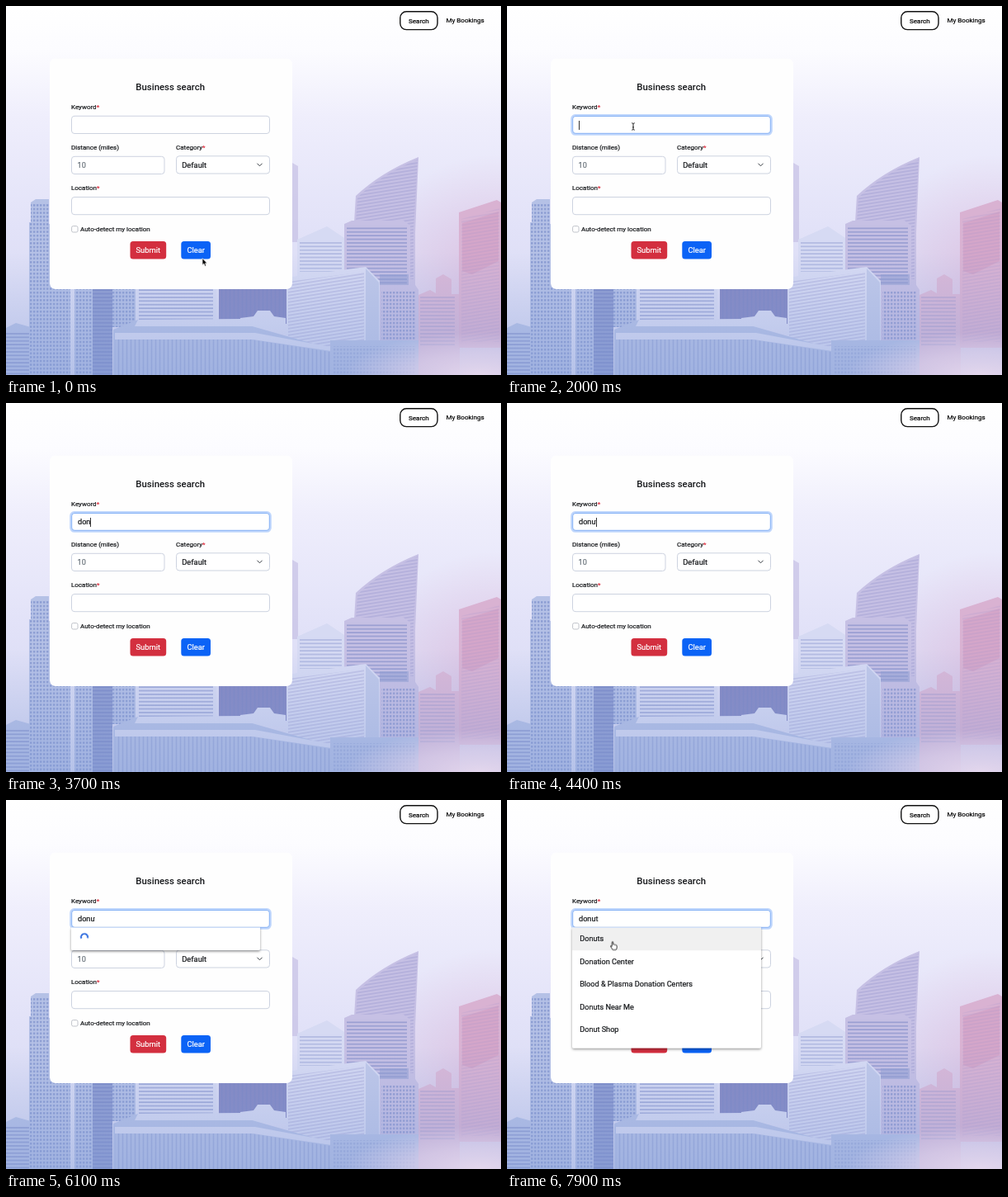
Write an HTML page that moves like this. It is 600 px wide and 447 px high and loops after 8 s.

```html
<!DOCTYPE html>
<html lang="en">
<head>
<meta charset="utf-8">
<title>Business search</title>
<style>
html, body { margin: 0; width: 100%; height: 100%; overflow: hidden; background: #fff; }
svg { display: block; position: absolute; left: 0; top: 0; width: 600px; height: 447px; }
text, .typed { font-family: Roboto, Arial, sans-serif; font-size: 9.14px; }
text { --ink: #16181b; fill: var(--ink); stroke: var(--ink); stroke-width: .22px; }
.label { font-size: 8px; }
.req { fill: #dc3545; stroke: #dc3545; }
.title { font-size: 11.4px; font-weight: 500; stroke: none; }
.mid { text-anchor: middle; }
.nav { font-size: 8.05px; --ink: #000; }
.btn { font-size: 9.4px; --ink: #fff; text-anchor: middle; }
.hint { --ink: #6c757d; }
.field { fill: #fff; stroke: #cdd3e0; stroke-width: 1; }

/* skyline */
.blue { fill: #b5c1e6; } .deep { fill: #8f9dd1; } .pale { fill: #d6daf3; }
.lilac { fill: #c6c0e4; } .pink { fill: #d9b2d2; }

/* timeline: 8 s, 1% = 80 ms */
.focus, .typed, .cursor, .arrow, .beam, .hand, .loading, .results, .hover {
  animation: 8s step-end infinite;
}
.focus { animation-name: focus; }
@keyframes focus { 0% { opacity: 0 } 10% { opacity: 1 } }

.typed {
  position: absolute; left: 87px; top: 138.5px; height: 11px; line-height: 11px;
  color: #16181b; -webkit-text-stroke: .22px; overflow: hidden; white-space: nowrap;
  border-right: 1px solid #333; animation-name: type, caret;
}
@keyframes type {
  0% { width: 0 } 36.25% { width: 5.2px } 41.25% { width: 10.4px }
  45% { width: 15.4px } 52.5% { width: 20.5px } 80% { width: 23.6px }
}
@keyframes caret {
  0% { border-color: transparent } 10% { border-color: #333 }
  16.25% { border-color: transparent } 22.5% { border-color: #333 }
  28.75% { border-color: transparent } 35% { border-color: #333 }
  58.75% { border-color: transparent } 65% { border-color: #333 }
  71.25% { border-color: transparent } 80% { border-color: #333 }
  86.25% { border-color: transparent } 92.5% { border-color: #333 }
  98.75% { border-color: transparent }
}

.loading { animation-name: loading; }
@keyframes loading { 0% { opacity: 0 } 66.25% { opacity: 1 } 90% { opacity: 0 } }
.results { animation-name: results; }
@keyframes results { 0% { opacity: 0 } 90% { opacity: 1 } }
.hover { animation-name: hover; }
@keyframes hover { 0% { opacity: 0 } 93.75% { opacity: 1 } }
.spin { transform-origin: 95px 166.3px; animation: spin 1s linear infinite; }
@keyframes spin { to { transform: rotate(360deg) } }

.cursor { animation-name: move; animation-timing-function: ease-in-out; }
@keyframes move {
  0%, 1.25% { transform: translate(238px, 305.6px) }
  8.75%, 91.25% { transform: translate(153px, 146px) }
  96.25%, 100% { transform: translate(128px, 171.5px) }
}
.arrow { animation-name: arrow; }
@keyframes arrow { 0% { opacity: 1 } 7.5% { opacity: 0 } }
.beam { animation-name: beam; }
@keyframes beam { 0% { opacity: 0 } 7.5% { opacity: 1 } 35% { opacity: 0 } 91.25% { opacity: 1 } 93.75% { opacity: 0 } }
.hand { animation-name: hand; }
@keyframes hand { 0% { opacity: 0 } 93.75% { opacity: 1 } }
</style>
</head>
<body>
<svg viewBox="0 0 600 447">
  <defs>
    <linearGradient id="sky" x2="0" y2="1">
      <stop offset="0" stop-color="#fff"/><stop offset=".12" stop-color="#fcfcff"/>
      <stop offset=".3" stop-color="#efeefc"/><stop offset=".6" stop-color="#e2e2f8"/>
      <stop offset="1" stop-color="#d3d6f0"/>
    </linearGradient>
    <radialGradient id="glow" gradientUnits="userSpaceOnUse" cx="590" cy="330" r="150">
      <stop offset="0" stop-color="#d78fbd" stop-opacity=".38"/>
      <stop offset="1" stop-color="#d78fbd" stop-opacity="0"/>
    </radialGradient>
    <linearGradient id="haze" x2="0" y2="1">
      <stop offset=".4" stop-color="#7f9ad8" stop-opacity="0"/>
      <stop offset="1" stop-color="#7f9ad8" stop-opacity=".5"/>
    </linearGradient>
    <radialGradient id="mist">
      <stop offset="0" stop-color="#e6d8ed" stop-opacity=".95"/>
      <stop offset=".5" stop-color="#e2d4ec" stop-opacity=".6"/>
      <stop offset="1" stop-color="#e2d4ec" stop-opacity="0"/>
    </radialGradient>
    <pattern id="rows" width="8" height="4.4" patternUnits="userSpaceOnUse">
      <path d="M0 1h8" stroke="#6c7bbf" stroke-width="1.7" opacity=".5"/>
    </pattern>
    <pattern id="slant" width="8" height="4" patternUnits="userSpaceOnUse" patternTransform="skewY(-9)">
      <path d="M0 1h8" stroke="#8887c6" stroke-width="1.3" opacity=".42"/>
    </pattern>
    <pattern id="grid" width="4" height="4.6" patternUnits="userSpaceOnUse">
      <path d="M1 1h2.4v2.4h-2.4z" fill="#6277bd" opacity=".5"/>
    </pattern>
    <pattern id="cols" width="5" height="8" patternUnits="userSpaceOnUse">
      <path d="M1.5 0v8" stroke="#7183c3" stroke-width="1.6" opacity=".35"/>
    </pattern>
    <filter id="shade" x="-10%" y="-10%" width="120%" height="130%">
      <feDropShadow dx="0" dy="1.5" stdDeviation="1.5" flood-opacity=".42"/>
    </filter>
  </defs>

  <rect width="600" height="447" fill="url(#sky)"/>
  <rect width="600" height="447" fill="url(#glow)"/>

  <g id="city">
    <!-- left -->
    <path class="blue" d="M0 390l12-6 18 5v58H0z"/>
    <path fill="url(#rows)" d="M0 394h28v53H0z"/>
    <path class="blue" d="M30 238l6-4h16v30h53v183H28V262h2z"/>
    <path fill="url(#grid)" d="M30 240h22v25h53v182H28V262h2z"/>
    <path class="pale" d="M78 343h5v104h-5z"/>
    <path class="deep" d="M105 343h24v104h-24z"/>
    <path fill="url(#rows)" d="M105 343h24v104h-24z"/>
    <path class="blue" d="M129 343h29v46h-29z"/>
    <path fill="url(#grid)" d="M129 343h29v46h-29z"/>

    <!-- centre -->
    <path class="pale" d="M157 340h98v43h-98z"/>
    <path fill="url(#rows)" d="M161 343h90v40h-90z"/>
    <path fill="#8589c3" d="M258 335h83v50h-83z"/>
    <path fill="url(#cols)" d="M258 335h83v50h-83z"/>
    <path class="pale" d="M284 390v-12l16-2 5-7h15l5 7 14 2v14z"/>

    <!-- right -->
    <path class="lilac" opacity=".7" d="M347 190l7 4v92h-7z"/>
    <path class="pale" d="M353 283l36-16 21 14v50h-57z"/>
    <path fill="url(#rows)" opacity=".7" d="M356 284h51v38h-51z"/>
    <path class="lilac" d="M422 262l2-32Q455 201 500 183l-4 92v70h-74z"/>
    <path fill="url(#slant)" d="M424 262l2-30Q456 203 499 186l-5 85v60h-70z"/>
    <path class="lilac" d="M410 264l9-4h63l8 6v80h-80z"/>
    <path fill="url(#rows)" d="M413 266h73v78h-73z"/>
    <path class="deep" opacity=".5" d="M453 325h35v22h-35z"/>
    <path class="lilac" d="M453 338h43l4 6v103h-47z"/>
    <path fill="url(#grid)" d="M455 346h41v101h-41z"/>
    <path class="pale" d="M340 329l96-13 17 17v114H340z"/>
    <path fill="url(#slant)" d="M342 334l92-12v125h-92z"/>
    <path class="blue" opacity=".7" d="M436 318l16 17v112h-16z"/>
    <path class="pink" opacity=".75" d="M500 350l14-6 7 4v-18l9-5 10 6v18h10v98h-50z"/>
    <path fill="url(#rows)" opacity=".5" d="M502 352h42v60h-42z"/>
    <path class="pink" d="M549 250l46-15 5 3v176h-51z"/>
    <path fill="#cd93bb" opacity=".4" d="M553 263l44-14v60l-32 16-12-4z"/>
    <path fill="url(#slant)" opacity=".5" d="M552 258l46-13v162h-46z"/>

    <!-- long hall in front -->
    <path class="blue" d="M130 392l30-12 135 7 98 28v32H130z"/>
    <path class="pale" d="M160 380l128-1 12 9H156zM132 396h170l92 17v5l-95-14H132z"/>
    <path fill="url(#cols)" d="M132 404h165l96 15v28H132z"/>
    <path class="blue" d="M393 405h107v42H393z"/>
    <path fill="url(#grid)" opacity=".5" d="M396 412h100v35H396z"/>
  </g>
  <rect width="600" height="247" y="200" fill="url(#haze)" opacity=".75"/>
  <ellipse cx="575" cy="447" rx="165" ry="52" fill="url(#mist)"/>

  <!-- navigation -->
  <rect x="477.8" y="6.8" width="45.2" height="21.8" rx="7.5" fill="#fff" stroke="#111" stroke-width="1.4"/>
  <text class="nav mid" x="500.4" y="20.6">Search</text>
  <text class="nav" x="533.5" y="19.6">My Bookings</text>

  <!-- form -->
  <rect x="53" y="63.5" width="294" height="279.5" rx="7" fill="#fefefe"/>
  <text class="title mid" x="199.2" y="102.2">Business search</text>
  <text class="label" x="79" y="125.3">Keyword<tspan class="req">*</tspan></text>
  <rect class="field" x="79.5" y="133.3" width="240" height="21.2" rx="3.5"/>
  <text class="label" x="79" y="174.3">Distance (miles)</text>
  <rect class="field" x="79.5" y="182.3" width="112.5" height="21.2" rx="3.5"/>
  <text class="hint" x="86.5" y="196">10</text>
  <text class="label" x="206" y="174.3">Category<tspan class="req">*</tspan></text>
  <rect class="field" x="206.5" y="181.8" width="113" height="21.2" rx="3.5"/>
  <text x="213.2" y="195.6" style="font-size:9.4px">Default</text>
  <path d="M304.7 191l2.8 2.8 2.8-2.8" fill="none" stroke="#343a40" stroke-width="1" stroke-linecap="round" stroke-linejoin="round"/>
  <text class="label" x="79" y="223.3">Location<tspan class="req">*</tspan></text>
  <rect class="field" x="79.5" y="231.5" width="240" height="21.2" rx="3.5"/>
  <rect x="79.6" y="266.6" width="7.4" height="7.4" rx="1.8" fill="#fff" stroke="#b9bdc5" stroke-width=".9"/>
  <text class="label" x="90" y="272.8">Auto-detect my location</text>
  <rect x="150.5" y="285" width="43.7" height="21.5" rx="3.5" fill="#d32f3f"/>
  <text class="btn" x="172.3" y="299.2">Submit</text>
  <rect x="212.3" y="285" width="35.7" height="21.5" rx="3.5" fill="#0b63f6"/>
  <text class="btn" x="230.2" y="299.2">Clear</text>

  <g class="focus">
    <rect x="78.5" y="132.3" width="242" height="23.2" rx="4.3" fill="#fff" stroke="#bfd6fc" stroke-width="2.6"/>
    <rect x="79.7" y="133.5" width="239.6" height="20.8" rx="3.3" fill="#fff" stroke="#83b0f5"/>
  </g>

  <!-- suggestions -->
  <g class="loading">
    <path d="M79 154.5h229v25.4q0 2-2 2H81q-2 0-2-2z" fill="#fff" filter="url(#shade)"/>
    <circle class="spin" cx="95" cy="166.3" r="4.1" fill="none" stroke="#1d5fdc" stroke-width="1.8" stroke-dasharray="15 10.8" stroke-dashoffset="17.3"/>
  </g>
  <g class="results">
    <path d="M79 154.5h229v144q0 2-2 2H81q-2 0-2-2z" fill="#fff" filter="url(#shade)"/>
    <rect class="hover" x="79" y="154.8" width="229" height="27.4" fill="#f0f0f0"/>
    <text x="88.2" y="171.4">Donuts</text>
    <text x="88.2" y="198.9">Donation Center</text>
    <text x="88.2" y="226.3">Blood &amp; Plasma Donation Centers</text>
    <text x="88.2" y="253.8">Donuts Near Me</text>
    <text x="88.2" y="281.2">Donut Shop</text>
  </g>
</svg>

<div class="typed">donut</div>

<svg viewBox="0 0 600 447">
  <g class="cursor">
    <path class="arrow" d="M0 0v8.2l1.9-1.7 1.3 3 1.5-.7-1.3-2.8h2.5z" fill="#000" stroke="#fff" stroke-width=".7"/>
    <path class="beam" d="M-1.8-4.2q1.8 0 1.8 1v6.4q0 1-1.8 1M1.8-4.2q-1.8 0-1.8 1m0 6.4q0 1 1.8 1M-1 .9h2" fill="none" stroke="#222" stroke-width="1"/>
    <path class="hand" d="M-.8 5V.6Q0-.6.8.6v3q1-.7 1.6.3 1-.5 1.5.4 1.3-.3 1.3 1v2q0 2.2-1.2 2.7H.2Q-.8 8.2-2.4 6q-.6-1.6 1.6-.2z" fill="#fff" stroke="#222" stroke-width=".9" stroke-linejoin="round"/>
  </g>
</svg>
</body>
</html>
```
